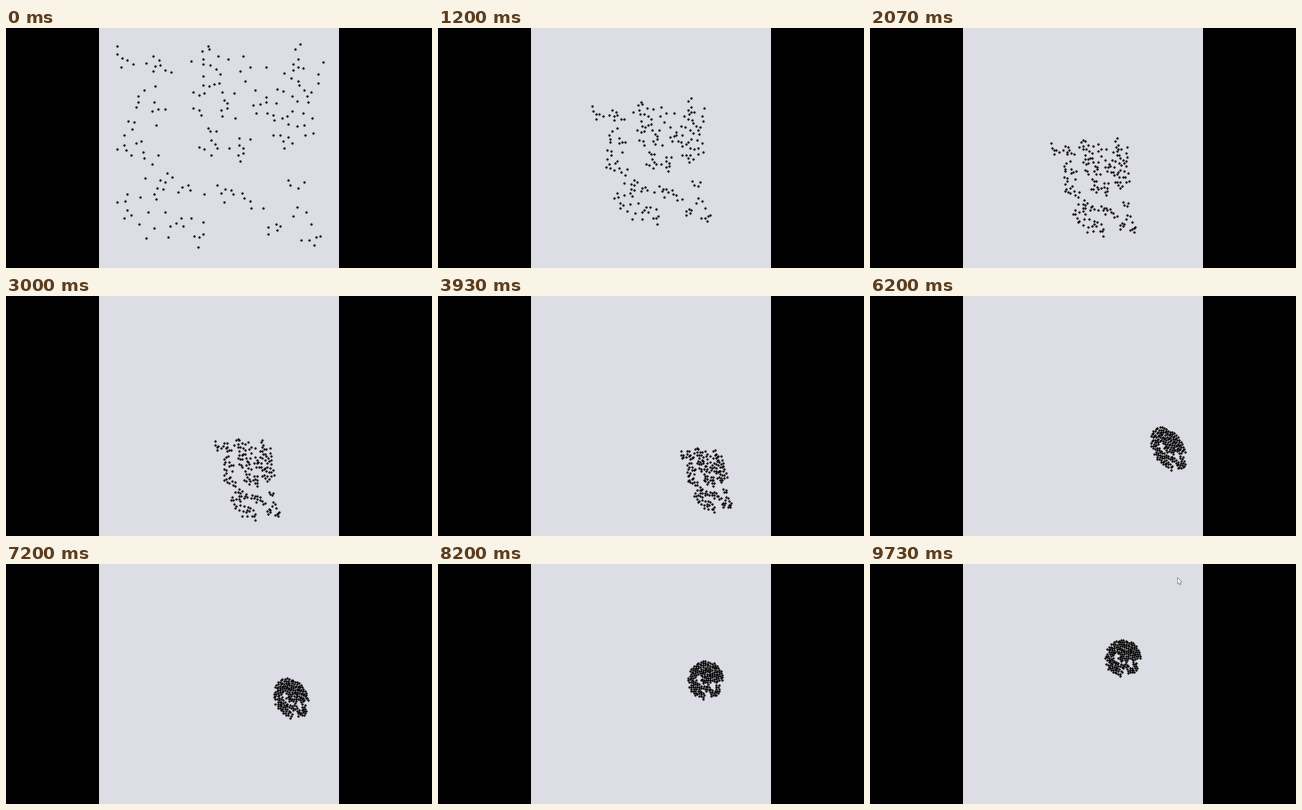
These frames come from a looping animation (426 px wide and 240 px high, 9790 ms). A matplotlib script:

```python
import numpy as np
import matplotlib.pyplot as plt
from matplotlib.animation import FuncAnimation
from matplotlib.patches import Polygon, Rectangle

W, H, DPI = 426, 240, 100
LOOP, FRAMES = 9790, 147
COUNT = 204
PAPER = "#dddde5"
X0, X1, Y0, Y1 = 105, 322, 15, 225

# A few fixed dots; the others are scattered around them.
ANCHORS = np.array([
    (111, 18), (127, 36), (154, 37), (196, 23), (212, 28), (210, 41),
    (203, 58), (294, 16), (312, 46), (287, 42), (244, 39), (228, 65),
    (138, 62), (152, 81), (122, 93), (118, 117), (137, 124), (154, 152),
    (184, 162), (215, 165), (150, 171), (121, 182), (133, 196), (170, 195),
    (188, 208), (193, 82), (216, 88), (205, 112), (237, 125), (247, 77),
    (270, 75), (281, 88), (302, 74), (298, 97), (277, 113), (298, 154),
    (244, 173), (300, 184), (271, 202), (303, 212)], float)

# Swarm outline at key times: top left, top right, bottom right, bottom left.
TIMES = np.array([0, 1200, 3000, 4870, 6200, 8200, 9730], float)


def box(cx, cy, ux, uy, vx, vy):
    u, v = np.array([ux, uy]), np.array([vx, vy])
    return np.array([cx, cy]) + np.array([-u - v, u - v, u + v, v - u])


CORNERS = np.array([
    [(X0, Y0), (X1, Y0), (X1, Y1), (X0, Y1)],
    [(149, 76), (269, 68), (276, 198), (181, 201)],
    [(204, 141), (266, 143), (277, 225), (230, 227)],
    [(265, 148), (305, 149), (317, 199), (286, 201)],
    box(298.3, 153, 17, 3, 5, 21.5),
    box(267, 116, 17.5, 0, 0, 19),
    box(252.5, 94, 17.5, 0, 0, 18)], float)
ROUNDNESS = np.array([0, 0.05, 0.25, 0.6, 1, 1, 1])
SLOPES = np.gradient(CORNERS, TIMES, axis=0)


def scatter_dots(rng):
    dots = list(ANCHORS)
    while len(dots) < COUNT:
        angle, dist = rng.uniform(0, 2 * np.pi), rng.uniform(5, 17)
        base = ANCHORS[rng.integers(len(ANCHORS))]
        p = base + dist * np.array([np.cos(angle), np.sin(angle)])
        inside = X0 + 1 < p[0] < X1 and Y0 + 1 < p[1] < Y1
        if inside and np.hypot(*(np.array(dots) - p).T).min() > 4:
            dots.append(p)
    return np.array(dots)


def pack_disc(square, gap=0.118, steps=150):
    """Map the square to a unit disc and push crowded dots apart."""
    u, v = square.T
    p = np.column_stack([u * np.sqrt(1 - v**2 / 2), v * np.sqrt(1 - u**2 / 2)])
    for _ in range(steps):
        diff = p[:, None] - p[None]
        dist = np.hypot(diff[..., 0], diff[..., 1]) + 1e-9
        push = np.clip(gap - dist, 0, None) / dist
        p = p + 0.35 * (push[..., None] * diff).sum(axis=1)
        p /= np.maximum(1, np.hypot(p[:, 0], p[:, 1]))[:, None]
    return p


def outline(t):
    """Cubic Hermite interpolation of the corners."""
    i = int(np.clip(np.searchsorted(TIMES, t, side="right") - 1, 0, len(TIMES) - 2))
    span = TIMES[i + 1] - TIMES[i]
    s = min((t - TIMES[i]) / span, 1)
    a = 2 * s**3 - 3 * s**2 + 1
    b = s**3 - 2 * s**2 + s
    c = s**3 - s**2
    return (a * CORNERS[i] + (1 - a) * CORNERS[i + 1]
            + span * (b * SLOPES[i] + c * SLOPES[i + 1]))


def positions(t):
    k = np.interp(t, TIMES, ROUNDNESS)
    u, v = ((1 - k) * square + k * disc).T / 2 + 0.5
    u, v = u[:, None], v[:, None]
    tl, tr, br, bl = outline(t)
    return (1 - v) * ((1 - u) * tl + u * tr) + v * ((1 - u) * bl + u * br)


start = scatter_dots(np.random.default_rng(7))
square = (start - (X0, Y0)) / (X1 - X0, Y1 - Y0) * 2 - 1
disc = pack_disc(square)

fig = plt.figure(figsize=(W / DPI, H / DPI), dpi=DPI, facecolor="black")
ax = fig.add_axes([0, 0, 1, 1])
ax.set_xlim(0, W)
ax.set_ylim(H, 0)
ax.axis("off")
ax.add_patch(Rectangle((93, 0), 240, H, color=PAPER, lw=0))
dots = ax.scatter(*start.T, s=(2.3 * 72 / DPI)**2, c="black", lw=0)
arrow = [(307.5, 13.5), (307.5, 20), (309, 18.8), (310, 21),
         (311, 20.5), (310.2, 18.4), (312, 18.2)]
cursor = ax.add_patch(Polygon(arrow, fc="white", ec="#8c8c94", lw=0.5, zorder=3))


def draw(frame):
    dots.set_offsets(positions(frame * LOOP / FRAMES))
    cursor.set_visible(frame >= FRAMES - 4)
    return dots, cursor


anim = FuncAnimation(fig, draw, frames=FRAMES, interval=LOOP / FRAMES,
                     repeat=True, repeat_delay=0)
plt.show()
```
